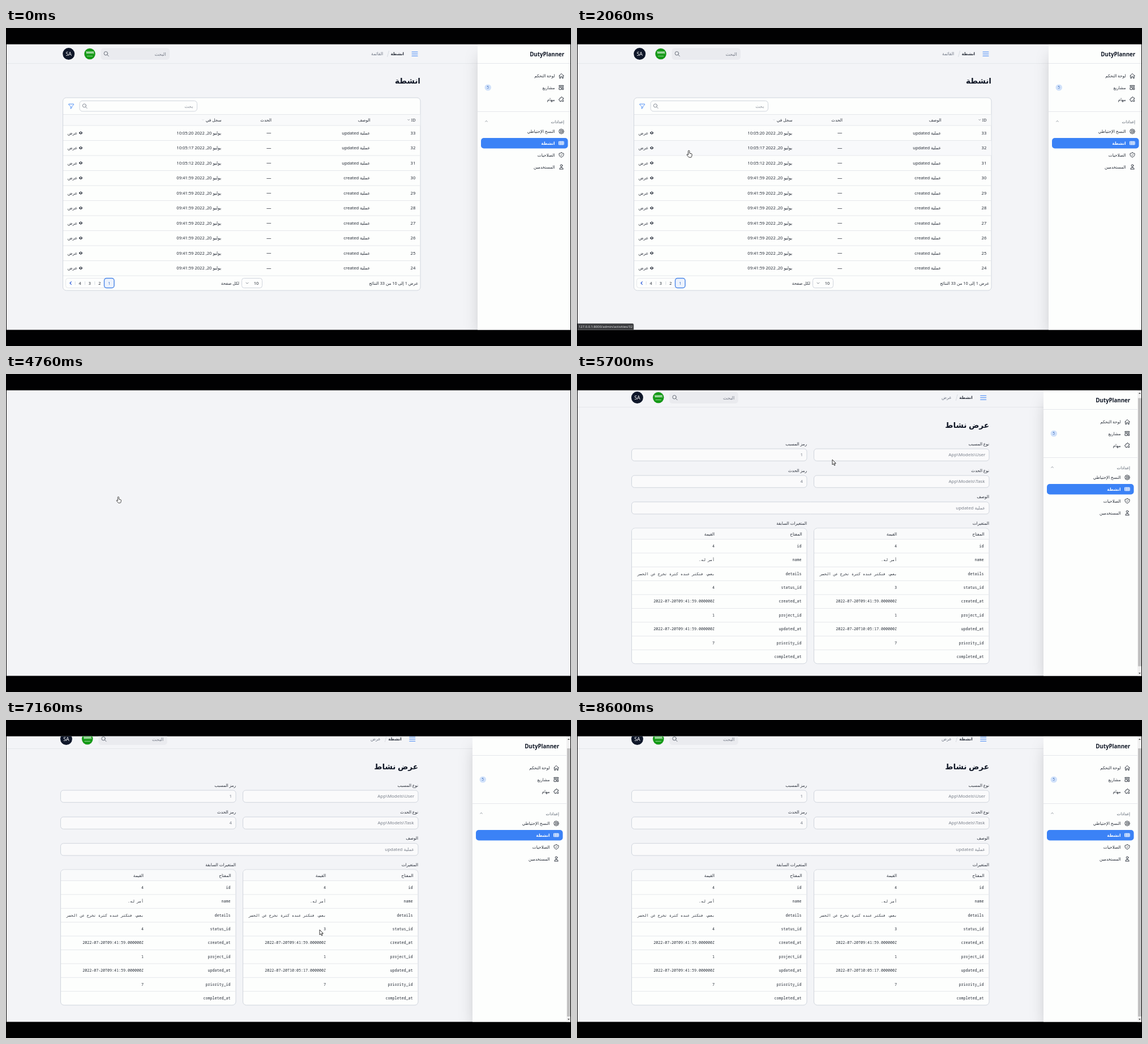
An HTML page with a canvas for the animation above (8.93 s loop, 998 px wide and 561 px high).

```html
<!DOCTYPE html>
<html lang="ar">
<head>
<meta charset="utf-8">
<title>DutyPlanner</title>
<style>
html, body { margin: 0; width: 100%; height: 100%; overflow: hidden; background: #010102; }
canvas { display: block; width: 998px; height: 561px; }
</style>
</head>
<body>
<canvas id="stage" width="998" height="561"></canvas>
<script>
const ctx = document.getElementById('stage').getContext('2d');
const LOOP = 8930;
const SANS = '"Noto Sans", "DejaVu Sans", sans-serif';
const MONO = '"Noto Sans Mono", "DejaVu Sans Mono", monospace';
const PAGE = '#f3f4f7', PAPER = '#fdfefd', SOFT = '#f9fafb';
const INK = '#272d38', DARK = '#111827', GRAY = '#737985';
const LINE = '#e5e7eb', EDGE = '#d0d5dd', BLUE = '#3b82f6';

const ICONS = {
  home: 'M3 12l9-9 9 9M5 10v11h4v-6h6v6h4V10',
  boards: 'M4 4h16v4H4zM4 12h8v8H4zM16 12h4v8h-4z',
  puzzle: 'M11 4a2 2 0 114 0v1a1 1 0 001 1h3a1 1 0 011 1v3a1 1 0 01-1 1h-1a2 2 0 100 4h1a1 1 0 011 1v3a1 1 0 01-1 1h-3a1 1 0 01-1-1v-1a2 2 0 10-4 0v1a1 1 0 01-1 1H7a1 1 0 01-1-1v-3a1 1 0 00-1-1H4a2 2 0 110-4h1a1 1 0 001-1V7a1 1 0 011-1h3a1 1 0 001-1z',
  buoy: 'M21 12a9 9 0 11-18 0 9 9 0 0118 0zM16 12a4 4 0 11-8 0 4 4 0 018 0zM5.6 5.6l3.6 3.6M14.8 14.8l3.6 3.6M18.4 5.6l-3.6 3.6M9.2 14.8l-3.6 3.6',
  table: 'M3 10h18M3 14h18M9 6v12M15 6v12M3 6h18v12H3z',
  shield: 'M9 12l2 2 4-4M12 3a12 12 0 01-8.6 3A12 12 0 003 9c0 5.6 3.8 10.3 9 11.6 5.2-1.3 9-6 9-11.6a12 12 0 00-.4-3A12 12 0 0112 3z',
  user: 'M16 7a4 4 0 11-8 0 4 4 0 018 0zM12 14a7 7 0 00-7 7h14a7 7 0 00-7-7z',
  search: 'M21 21l-6-6M17 10a7 7 0 11-14 0 7 7 0 0114 0z',
  funnel: 'M3 4h18v3l-7 7v4l-4 4v-8L3 7z',
  menu: 'M2 5h20M2 12h20M2 19h20',
  up: 'M5 15l7-7 7 7',
  down: 'M5 9l7 7 7-7',
  left: 'M15 5l-7 7 7 7'
};
for (const k in ICONS) ICONS[k] = new Path2D(ICONS[k]);

const EYE = new Path2D('M-3.3 0Q0-5 3.3 0Q0 5-3.3 0z');
const HAND = new Path2D('M-1.3 1.3a1.2 1.2 0 0 1 2.4 0V5l3.5.9q1 .3.9 1.4l-.6 3.2q-.3 1.7-1.5 1.7H.6q-.8 0-1.3-.7L-3.4 8.2q-.7-1 .2-1.4.7-.3 1.3.4l.6.7z');
const ARROW = new Path2D('M0 0V9L2 7.2 3.6 10.4 5 9.7 3.6 6.6H6.3z');

function text(s, x, y, size, color = INK, o = {}) {
  ctx.font = `${o.weight || 400} ${size}px ${o.font || SANS}`;
  ctx.direction = o.dir || 'rtl';
  ctx.textAlign = o.align || 'right';
  ctx.fillStyle = color;
  ctx.fillText(s, x, y + size * .36);
}

function box(x, y, x2, y2, r, fill, stroke, width = 1) {
  ctx.beginPath();
  ctx.roundRect(x, y, x2 - x, y2 - y, r);
  if (fill) { ctx.fillStyle = fill; ctx.fill(); }
  if (stroke) { ctx.strokeStyle = stroke; ctx.lineWidth = width; ctx.stroke(); }
}

function line(x, y, x2, y2, color = LINE, width = 1) {
  ctx.beginPath();
  ctx.moveTo(x, y);
  ctx.lineTo(x2, y2);
  ctx.strokeStyle = color;
  ctx.lineWidth = width;
  ctx.stroke();
}

function disc(x, y, r, color) {
  ctx.beginPath();
  ctx.arc(x, y, r, 0, 7);
  ctx.fillStyle = color;
  ctx.fill();
}

function icon(name, x, y, size, color = INK, width = 2) {
  const k = size / 24;
  ctx.save();
  ctx.translate(x, y);
  ctx.scale(k, k);
  ctx.translate(-12, -12);
  ctx.lineWidth = width;
  ctx.lineCap = ctx.lineJoin = 'round';
  ctx.strokeStyle = color;
  ctx.stroke(ICONS[name]);
  ctx.restore();
}

function at(x, y, draw) {
  ctx.save();
  ctx.translate(x, y);
  draw();
  ctx.restore();
}

function sidebar() {
  ctx.save();
  ctx.shadowColor = 'rgba(0,0,0,.25)';
  ctx.shadowBlur = 28;
  ctx.shadowOffsetY = 14;
  ctx.fillStyle = PAPER;
  ctx.fillRect(840, 36, 170, 490);
  ctx.restore();
  ctx.fillStyle = PAPER;
  ctx.fillRect(833, 29, 180, 504);
  text('DutyPlanner', 986, 46.5, 9.7, DARK, { weight: 700 });
  line(833, 62.5, 1010, 62.5);
  line(833, 147.5, 1010, 147.5);
  text('إعدادات', 986, 165, 7, '#4b5563');
  icon('up', 848.5, 164.5, 6, '#4b5563', 2.5);
  box(839, 194, 992.5, 212.5, 5, BLUE);
  const items = [
    ['home', 'لوحة التحكم', 84.5], ['boards', 'مشاريع', 105], ['puzzle', 'مهام', 126],
    ['buoy', 'النسخ الإحتياطي', 182.5], ['table', 'انشطة', 203],
    ['shield', 'الصلاحيات', 224], ['user', 'المستخدمين', 245]
  ];
  for (const [name, label, y] of items) {
    const on = name === 'table';
    icon(name, 981, y, 11, on ? '#fff' : INK);
    text(label, 969.5, y, 7.3, on ? '#fff' : INK, { weight: on ? 700 : 400 });
  }
  box(845.5, 99.5, 857, 110.5, 5.5, '#d0e1fa');
  text('5', 851.2, 105, 6.5, '#3f6fbe', { align: 'center' });
}

function topbar(crumb) {
  line(-10, 62.5, 850, 62.5);
  icon('menu', 722, 45.7, 12, BLUE, 2.3);
  text('انشطة', 703, 45.7, 7.1, INK, { weight: 700 });
  line(673.5, 51, 676.5, 40, '#d1d5db', .8);
  text(crumb, 666, 45.7, 7.5, '#6b7280');
  box(167.5, 35.5, 289, 56, 5, '#eaebef');
  icon('search', 177.3, 45.7, 11, '#5d6470');
  text('البحث', 282.5, 45.7, 8, GRAY);
  disc(148, 45.6, 10.2, '#d8dbdd');
  disc(148, 45.6, 9.7, '#159a17');
  for (let i = 0; i < 7; i++) line(142 + i * 2, 41, 142.8 + i * 2, 45.5, '#e9f7e9', .9);
  line(142, 43.5, 154, 43, '#e9f7e9', .8);
  line(143, 49.6, 153, 49.6, '#bfe6bf', .8);
  disc(110.7, 45.6, 10.5, '#0f172a');
  text('SA', 110.7, 45.8, 8.8, '#fff', { align: 'center' });
}

const ROW_TOP = 172, ROW_H = 26.5;

function listPage(hover) {
  topbar('القائمة');
  text('انشطة', 732, 93, 13.6, DARK, { weight: 700 });
  box(100.5, 123, 732, 463, 6, PAPER, EDGE);
  icon('funnel', 115.3, 137.8, 11, BLUE);
  box(130, 128.5, 337.5, 147, 5, PAPER, EDGE);
  icon('search', 139.3, 137.8, 10.5, '#7a808c');
  text('بحث', 330.5, 138, 8, '#9297a1');

  ctx.fillStyle = SOFT;
  ctx.fillRect(101, 152.5, 630.5, 19.5);
  line(101, 152.5, 731.5, 152.5);
  line(101, 172, 731.5, 172);
  const head = { weight: 500 };
  text('ID', 723.5, 162, 7.3, INK, head);
  icon('down', 711.2, 162, 5, '#555b66', 3);
  text('الوصف', 643.5, 162, 7.3, INK, head);
  text('الحدث', 469, 162, 7.3, INK, head);
  text('سجل في', 380.5, 162, 7.3, INK, head);
  icon('down', 348, 162, 4.5, '#c3c7ce', 3);

  for (let i = 0; i < 10; i++) {
    const top = ROW_TOP + i * ROW_H, y = top + 13.2;
    if (i === hover) {
      ctx.fillStyle = '#f8f9fb';
      ctx.fillRect(101, top + .5, 631, ROW_H - 1);
    }
    line(101, top + ROW_H, 731.5, top + ROW_H);
    const time = i < 3 ? '10:05:' + [20, 17, 12][i] : '09:41:59';
    text(String(33 - i), 723.3, y, 7.6);
    text('عملية ' + (i < 3 ? 'updated' : 'created'), 643, y, 7.6);
    text('—', 468.5, y, 8.5);
    text('يوليو 20, 2022 ' + time, 380, y, 7.6);
    at(132, y - .3, () => {
      ctx.fillStyle = '#353b47';
      ctx.fill(EYE);
      disc(0, 0, 1.1, PAPER);
    });
    text('عرض', 126, y, 7.3);
  }

  text('عرض 1 إلى 10 من 33 النتائج', 728, 450, 7.3, INK, head);
  text('لكل صفحة', 412, 450, 7.3, INK, head);
  box(416.5, 441.5, 452.5, 458.5, 4, PAPER, EDGE);
  text('10', 446.3, 450, 7.5);
  icon('down', 426, 450, 7, '#5f6672', 2.5);
  box(105.5, 441.5, 191, 458.5, 4, PAPER, LINE);
  box(173.5, 441.5, 191, 458.5, 4, '#edf3fd', '#4a86e8', 1.4);
  text('1', 182.3, 450, 7.2, '#2f68c8', { align: 'center' });
  [2, 3, 4].forEach((n, i) => {
    text(String(n), 165.2 - i * 17.3, 450, 7.2, INK, { align: 'center' });
    line(156.8 - i * 17.3, 447, 156.8 - i * 17.3, 453, EDGE, .8);
  });
  icon('left', 114.3, 450, 8, '#1d4ed8', 3.2);
}

function field(label, value, x, x2, y) {
  text(label, x2, y, 7.3, INK, { weight: 500 });
  box(x, y + 9, x2, y + 30.3, 5, '#fafafb', EDGE);
  text(value, x2 - 7, y + 19.6, 7.9, '#7a808b');
}

function changes(label, x, status, updated) {
  const x2 = x + 309.5;
  text(label, x2, 263.5, 7.3, INK, { weight: 500 });
  box(x, 272, x2, 511, 6, PAPER, EDGE);
  box(x + .5, 272.5, x2 - .5, 291.5, [5.5, 5.5, 0, 0], SOFT);
  text('المفتاح', x2 - 8.5, 282, 7.3);
  text('القيمة', x2 - 163, 282, 7.3);
  const mono = { font: MONO };
  const rows = [
    ['id', '4'], ['name', 'أمر له.'],
    ['details', 'بعض، فتكثر عنده كثرة تخرج عن الحصر'],
    ['status_id', status], ['created_at', '2022-07-20T09:41:59.000000Z'],
    ['project_id', '1'], ['updated_at', updated],
    ['priority_id', '7'], ['completed_at', '']
  ];
  ctx.save();
  ctx.beginPath();
  ctx.rect(x + 9.5, 272, x2 - x - 10, 239);
  ctx.clip();
  rows.forEach(([key, value], i) => {
    const y = 303.3 + i * 24.4;
    text(key, x2 - 9.5, y, 6.67, INK, mono);
    text(value, x2 - 163, y, 6.67, INK, mono);
  });
  ctx.restore();
  for (let i = 0; i < 9; i++) line(x + .5, 291.5 + i * 24.4, x2 - .5, 291.5 + i * 24.4);
}

function showPage() {
  text('عرض نشاط', 728, 90, 13.6, DARK, { weight: 700 });
  field('نوع المسبب', 'App\\Models\\User', 418.5, 728, 123);
  field('رمز المسبب', '1', 96.5, 406, 123);
  field('نوع الحدث', 'App\\Models\\Task', 418.5, 728, 170);
  field('رمز الحدث', '4', 96.5, 406, 170);
  field('الوصف', 'عملية updated', 96.5, 728, 216.7);
  changes('المتغيرات', 418.5, '3', '2022-07-20T10:05:17.000000Z');
  changes('المتغيرات السابقة', 96.5, '4', '2022-07-20T09:41:59.000000Z');
}

function scrollbar(scroll) {
  ctx.fillStyle = '#f1f1f1';
  ctx.fillRect(990, 29, 8, 504);
  const top = 38.8 + scroll * .94;
  ctx.fillStyle = '#c1c1c1';
  ctx.fillRect(991, top, 6, 473);
  for (const [y, d] of [[34, -1], [528, 1]]) {
    ctx.beginPath();
    ctx.moveTo(991.8, y - d);
    ctx.lineTo(996, y - d);
    ctx.lineTo(993.9, y + d * 1.2);
    ctx.fillStyle = '#505050';
    ctx.fill();
  }
}

// Pointer keys: time, x, y
const PATH = [
  [30, 860, 190], [300, 815, 320], [600, 735, 455], [900, 672, 452], [1060, 649, 430.5],
  [1350, 700, 310], [1620, 570, 153], [1760, 502, 210], [1860, 500, 211], [2060, 197.7, 216],
  [5300, 198.5, 216.5], [5560, 451, 151], [5700, 451, 151], [6150, 590, 265], [6560, 640, 338],
  [6850, 713, 371], [7160, 554, 370], [7460, 356, 372], [7530, 330, 372], [7880, 201, 371],
  [8230, 579, 372], [8400, 573, 368], [8600, 557, 370]
];

function pointer(t) {
  let i = 1;
  while (i < PATH.length - 1 && PATH[i][0] < t) i++;
  const [t0, x0, y0] = PATH[i - 1], [t1, x1, y1] = PATH[i];
  const k = Math.min(1, Math.max(0, (t - t0) / (t1 - t0)));
  return t > 2060 && t < 4160 ? [197.7, 216]
    : t >= 4160 && t < 5300 ? [198.5, 216.5]
    : [x0 + (x1 - x0) * k, y0 + (y1 - y0) * k];
}

function cursor(x, y, shape, k) {
  at(x, y, () => {
    ctx.scale(k, k);
    ctx.lineJoin = 'round';
    ctx.fillStyle = '#fff';
    ctx.fill(shape);
    ctx.strokeStyle = '#1c1c1c';
    ctx.lineWidth = .9;
    ctx.stroke(shape);
  });
}

function linkHint(id, alpha) {
  ctx.globalAlpha = alpha;
  box(0, 521.5, 100, 533, [0, 2, 0, 0], '#3b3c3f', '#6b6c6f', .6);
  text('127.0.0.1:8000/admin/activities/' + id, 3, 527.2, 5.9, '#e3e4e6', { dir: 'ltr', align: 'left' });
  ctx.globalAlpha = 1;
}

function draw(t) {
  ctx.fillStyle = '#010102';
  ctx.fillRect(0, 0, 998, 561);
  ctx.save();
  ctx.beginPath();
  ctx.rect(1, 28.7, 996, 503.8);
  ctx.clip();
  ctx.fillStyle = PAGE;
  ctx.fillRect(0, 28, 998, 506);

  const seen = t >= 30 && t < 8600;
  const [x, y] = pointer(t);
  let hand = false;
  if (t < 4760) {
    const inside = seen && x > 101 && x < 732 && y > 150 && y < 437;
    const row = Math.floor((y - ROW_TOP) / ROW_H);
    hand = inside && row >= 0;
    listPage(hand ? row : -1);
    sidebar();
    if (inside) linkHint(33 - Math.max(0, row), Math.min(1, Math.max(0, (4605 - t) / 90)));
  } else if (t < 5300) {
    hand = true;
  } else {
    const k = Math.min(1, Math.max(0, (t - 5705) / 150));
    const scroll = 4 + 8 * k * k * (3 - 2 * k);
    at(-4.3, -scroll, () => topbar('عرض'));
    at(0, 4 - scroll, showPage);
    at(-9, 0, sidebar);
    scrollbar(scroll);
  }
  if (seen) cursor(x, y, hand ? HAND : ARROW, hand && t >= 4160 ? .9 : 1);
  ctx.restore();
}

let start;
function tick(now) {
  if (start === undefined) start = now;
  draw((now - start) % LOOP);
  requestAnimationFrame(tick);
}
requestAnimationFrame(tick);
</script>
</body>
</html>
```
